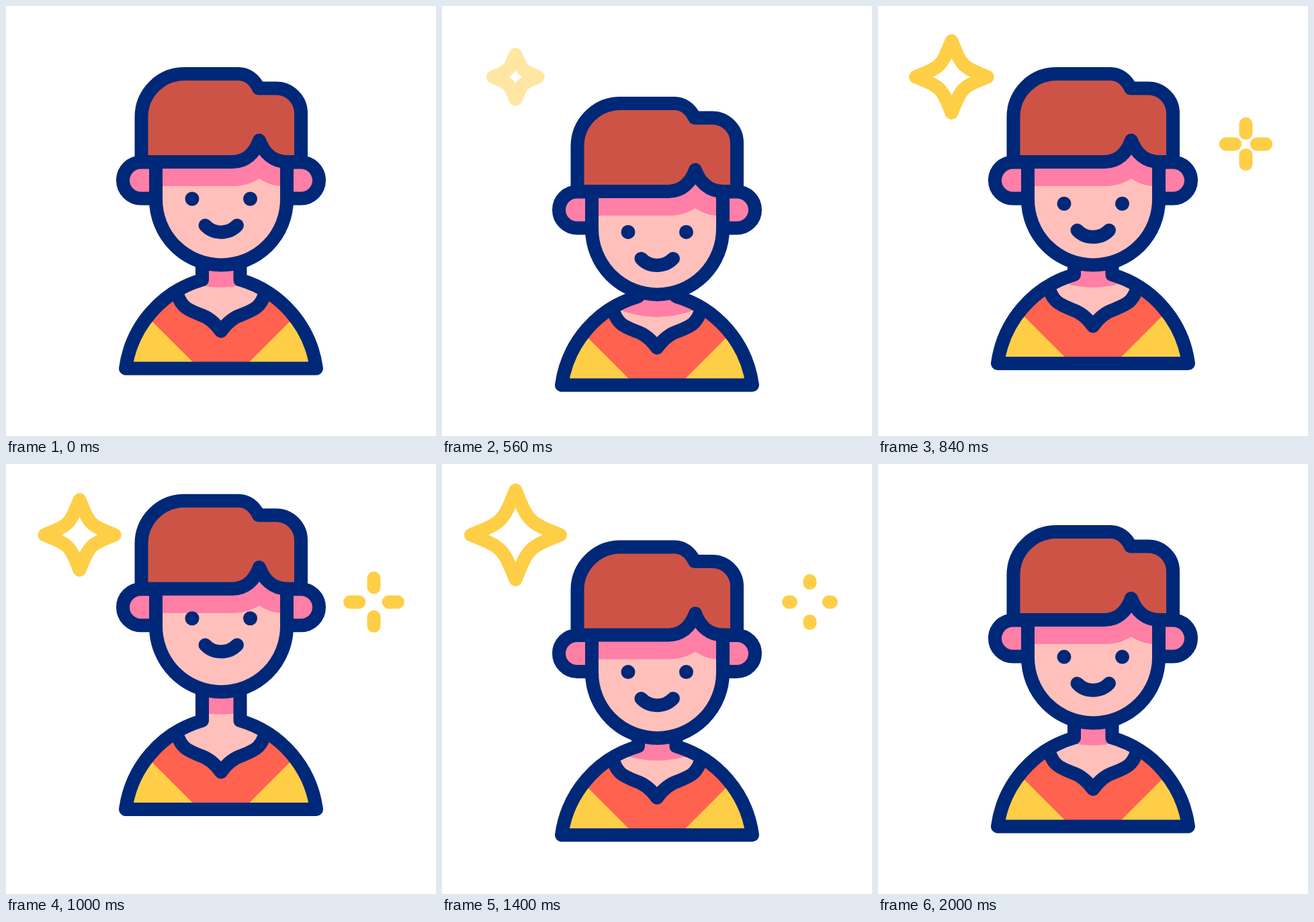
Write an HTML page that moves like this. It is 640 px wide and 640 px high and loops after 2200 ms.

```html
<!DOCTYPE html>
<html lang="en">
<head>
<meta charset="utf-8">
<title>Bouncing character</title>
<style>
  html, body { margin: 0; width: 100%; height: 100%; overflow: hidden; background: #fff; }
  svg { display: block; width: 100%; height: 100%; }
  .line, .spark { fill: none; stroke-width: 20; stroke-linecap: round; stroke-linejoin: round; }
  .line { stroke: #002878; }
  .spark { stroke: #ffce47; }
  .navy { fill: #002878; }
  .skin { fill: #ffc0bb; }
  .pink { fill: #ff7fa6; }
  .hair { fill: #cd5347; }
  .shirt { fill: #ff624f; }
  .sleeve { fill: #ffce47; }
</style>
</head>
<body>
<svg viewBox="0 0 640 640">
  <defs>
    <path id="torso" d="M292 290V407.5A160 160 0 0 0 178 539.5H462A160 160 0 0 0 348.5 407.5V290"/>
    <path id="collar" d="M256 432C262 447 268 451 288 459C304 464 313 474 320 484C327 474 336 464 352 459C372 451 378 447 384 432"/>
    <path id="throat" d="M292 290V407L256 432L320 450L384 432L348.5 407V290Z"/>
    <path id="face" d="M223 232V288A97.5 97.5 0 0 0 418 288V232"/>
    <path id="ear" d="M222 232.5H201A27 27 0 0 0 201 286.5H222"/>
    <path id="mop" d="M201.5 232V165A64 64 0 0 1 265 101H346C358 101 369 108 376 122.5H402A37 37 0 0 1 439 160V232H418C398 232 384 219 377 200C370 219 357 232 337 232Z"/>
    <g id="side">
      <use href="#ear" class="pink"/>
      <use href="#ear" class="line"/>
    </g>
    <clipPath id="torsoClip"><use href="#torso"/></clipPath>
    <clipPath id="neckClip"><use href="#throat"/><use href="#collar"/></clipPath>
    <clipPath id="faceClip"><path d="M223 200V288A97.5 97.5 0 0 0 418 288V200Z"/></clipPath>
  </defs>

  <path id="star" class="spark"/>
  <path id="burst" class="spark"/>

  <g id="body">
    <use href="#torso" class="shirt"/>
    <path class="sleeve" clip-path="url(#torsoClip)" d="M185 437L288 540H160ZM455 437L352 540H480Z"/>
    <g clip-path="url(#neckClip)">
      <rect class="skin" x="240" y="280" width="160" height="220"/>
      <circle id="neckShade" class="pink" cx="320" cy="269" r="150"/>
    </g>
    <use href="#collar" class="line"/>
    <use href="#torso" class="line"/>
  </g>

  <g id="head">
    <use href="#side"/>
    <use href="#side" transform="matrix(-1 0 0 1 640 0)"/>
    <use href="#face" class="skin"/>
    <path class="pink" clip-path="url(#faceClip)" d="M223 215H418V268H408C397 267 386 263 377 257C368 262 357 268 338 268H223Z"/>
    <g id="features">
      <circle class="navy" cx="277" cy="287" r="10.5"/>
      <circle class="navy" cx="363.5" cy="287" r="10.5"/>
      <path class="line" d="M296.5 326.5C309 340 331 340 344 326.5"/>
    </g>
    <use href="#face" class="line"/>
    <use href="#mop" class="hair"/>
    <use href="#mop" class="line"/>
  </g>
</svg>

<script>
const LOOP = 2200, STEP = 40, REST = 2000;
const el = id => document.getElementById(id);

// Smooth 0 to 1 between two times.
function ramp(t, from, to) {
  const p = Math.min(1, Math.max(0, (t - from) / (to - from)));
  return p * p * (3 - 2 * p);
}

// Eases through evenly spaced levels, beginning and ending at rest.
function swing(t, start, beat, levels) {
  let y = 0, last = 0;
  levels.forEach((level, i) => {
    y += (level - last) * ramp(t, start + i * beat, start + (i + 1) * beat);
    last = level;
  });
  return y;
}

const bounce = [1, -1, 0.5, 0];
const nod = [1, -1, 0, 0.8, 0];
const spokes = [[1, 0], [0, 1], [-1, 0], [0, -1]];

function starPath(cx, cy, r) {
  const waist = 0.287 * r;
  const sides = spokes.map(([c, s]) => {
    const bend = `${cx + waist * (c + s)} ${cy + waist * (s - c)}`;
    return `C${bend} ${bend} ${cx + r * c} ${cy + r * s}`;
  });
  return `M${cx} ${cy - r}${sides.join("")}Z`;
}

function burstPath(cx, cy, inner, outer) {
  return spokes.map(([x, y]) =>
    `M${cx + x * inner} ${cy + y * inner}L${cx + x * outer} ${cy + y * outer}`).join("");
}

const shift = (id, y) => el(id).setAttribute("transform", `translate(0 ${y})`);

function show(id, path, opacity) {
  el(id).setAttribute("d", path);
  el(id).setAttribute("opacity", opacity);
}

function draw(t) {
  const body = 25.5 * swing(t, 200, 400, bounce);
  const head = 49 * swing(t, 240, 400, bounce);
  shift("body", body);
  shift("head", head);
  shift("features", 13.5 * swing(t, 420, 320, nod));
  shift("neckShade", head - body);

  const starGlow = ramp(t, 440, 680) - ramp(t, 1400, 1640);
  const dip = 16 * (ramp(t, 680, 900) - ramp(t, 900, 1400));
  show("star", starPath(109.5, 105.5, starGlow * (66.5 - dip)), starGlow);

  const open = ramp(t, 720, 920);
  const inner = 8 + 13 * open + 7.5 * ramp(t, 920, 1240);
  const outer = 8 + 33.5 * open - 10 * ramp(t, 920, 1060);
  show("burst", burstPath(547.5, 205.5, inner, outer), ramp(t, 720, 800) - ramp(t, 1400, 1600));
}

function tick() {
  const t = performance.now() % LOOP;
  draw(Math.min(REST, Math.floor(t / STEP) * STEP));
  requestAnimationFrame(tick);
}
tick();
</script>
</body>
</html>
```
